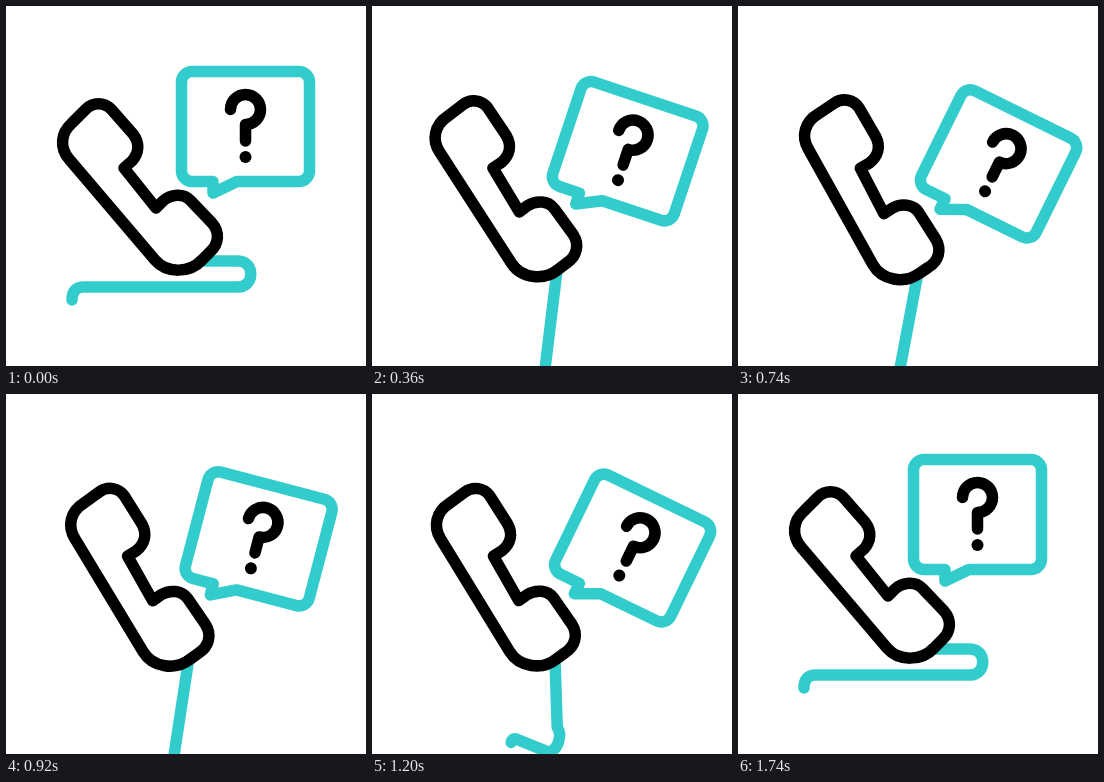
Recreate the animation shown at these times as an HTML page. Size 360x360 px, loop 2.4 s.

```html
<!DOCTYPE html>
<html lang="en">
<head>
<meta charset="utf-8">
<title>Ringing phone</title>
<style>
  html, body { margin: 0; width: 100%; height: 100%; overflow: hidden; background: #fff; }
  svg { display: block; width: 100%; height: 100%; }
  path { fill: none; stroke-width: 11.5; stroke-linecap: round; stroke-linejoin: round; }
  .teal { stroke: #33cccc; }
  .black { stroke: #000; }
</style>
</head>
<body>
<svg viewBox="0 0 360 360">
  <g id="phone">
    <path id="cord" class="teal"/>
    <path class="black" d="M63 153C53.5 142 54.5 127 66 117L80 103C87 96 98 96 105 103L127 128
      C134 137 133 147 126 155L118 162L150 202L157 195C165 188 177 187 184 194L206 217
      C214 226 213 238 204 246L196 254C184 267 161 268 149 254Z"/>
    <g id="bubble">
      <path class="teal" d="M186 175.5A10.5 10.5 0 0 1 175.5 165V76A10.5 10.5 0 0 1 186 65.5H293
        A10.5 10.5 0 0 1 303.5 76V165A10.5 10.5 0 0 1 293 175.5H231L207 187V175.5Z"/>
      <path class="black" d="M224.5 103.5A15 15 0 1 1 239.5 118.5V135"/>
      <circle cx="239.5" cy="151" r="6"/>
    </g>
  </g>
</svg>
<script>
const LOOP = 2400, STEP = 20, SETTLED = 1740;
const LOW = 5, UNDERSHOOT = 3.2;  // degrees
const phone = document.getElementById('phone');
const bubble = document.getElementById('bubble');
const cord = document.getElementById('cord');

const mix = (a, b, k) => a + (b - a) * k;
const wave = k => (1 - Math.cos(Math.PI * k)) / 2;
const progress = (from, to, t) => wave(Math.min(1, Math.max(0, (t - from) / (to - from))));

// Swing up, rock between peak and LOW twice, drop past zero, settle.
function swing(t, { lag, beat, peak, fall, land }) {
  const beats = (t - lag) / beat;
  if (beats < 1) return peak * progress(0, 1, beats);
  if (beats < 5) return mix(peak, LOW, wave(beats - 1));
  return mix(peak, -UNDERSHOOT, progress(fall, land, t)) + UNDERSHOOT * progress(land, SETTLED, t);
}

// k = 0: cord lies flat; k = 1: it hangs down.
function cordPath(k) {
  const left = 1 - k;
  const x = mix(232, 196, k), y = mix(255, 353, k);
  const turn = x + 17 * left, pull = 8 * k;
  const endX = mix(66, 212, k), endY = mix(294, 367, k);
  const hook = endY - 13 * left;
  return `M195 255L${x} ${y}C${turn} ${y + pull} ${turn} ${y + 26 - pull} ${x - 6 * k} ${y + 26}` +
    `L${endX + 12 * left} ${hook}Q${endX} ${hook} ${endX} ${endY}`;
}

function draw(t) {
  const phoneAngle = swing(t, { lag: 0, beat: 210, peak: 18.5, fall: 1050, land: 1375 });
  const bubbleAngle = swing(t, { lag: 35, beat: 215, peak: 17.2, fall: 1185, land: 1385 });
  const drop = progress(0, 350, t) - progress(1090, 1375, t);
  phone.setAttribute('transform', `rotate(${phoneAngle} 119 184)`);
  bubble.setAttribute('transform', `rotate(${bubbleAngle} 207 176)`);
  cord.setAttribute('d', cordPath(drop));
}

const start = performance.now();
function tick() {
  const t = (performance.now() - start) % LOOP;
  draw(Math.floor(t / STEP) * STEP);
  requestAnimationFrame(tick);
}
tick();
</script>
</body>
</html>
```
